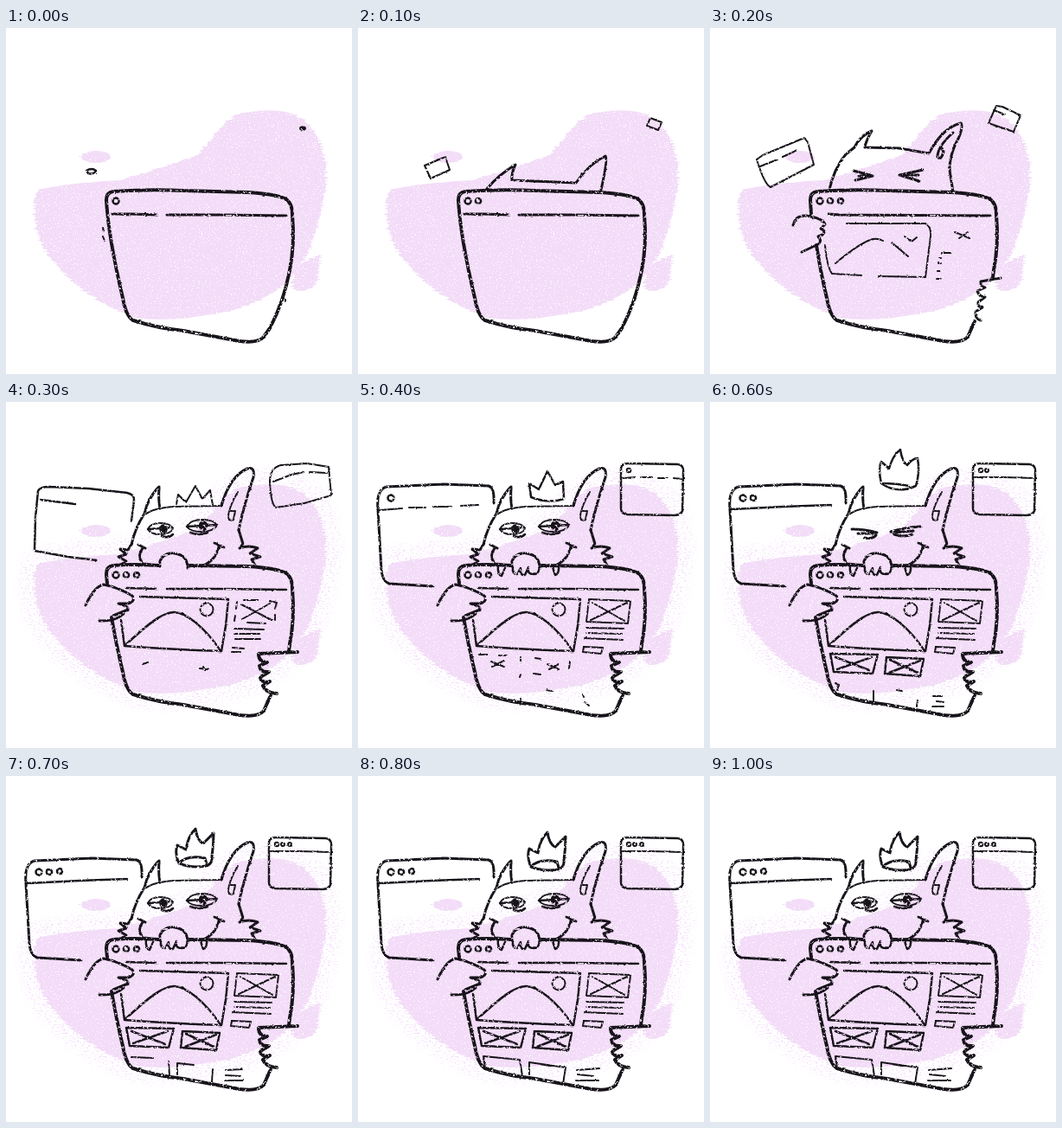
An HTML page for the animation above (1.1 s loop, 400 by 400 pixels).

```html
<!DOCTYPE html>
<html lang="en">
<head>
<meta charset="utf-8">
<title>Creature with browser window</title>
<style>
  html, body { margin: 0; width: 100%; height: 100%; overflow: hidden; background: #fff; }
  svg { display: block; width: 100vw; height: 100vh; }
  #ink { fill: none; stroke: #17131a; stroke-width: 2.5; stroke-linecap: round; stroke-linejoin: round; }
  #ink .bold { stroke-width: 4; }
  #ink .mid { stroke-width: 3; }
  #ink .thin { stroke-width: 2; }
  #ink .solid { fill: #17131a; }
</style>
</head>
<body>
<svg viewBox="0 0 400 400">
  <defs>
    <filter id="chalk" filterUnits="userSpaceOnUse" x="0" y="0" width="400" height="400" color-interpolation-filters="sRGB">
      <feTurbulence type="fractalNoise" baseFrequency=".025 .6" numOctaves="2" seed="4"/>
      <feColorMatrix values="1 0 0 0 0  0 0 0 0 .5  0 0 0 0 0  0 0 0 0 1" result="streaks"/>
      <feDisplacementMap in="SourceGraphic" in2="streaks" scale="12" xChannelSelector="R" yChannelSelector="G" result="edge"/>
      <feTurbulence type="fractalNoise" baseFrequency=".65" numOctaves="2" seed="9"/>
      <feColorMatrix values="0 0 0 0 0  0 0 0 0 0  0 0 0 0 0  7 0 0 0 -1.65" result="grain"/>
      <feComposite in="edge" in2="grain" operator="in"/>
    </filter>
    <filter id="spray" filterUnits="userSpaceOnUse" x="0" y="0" width="400" height="400" color-interpolation-filters="sRGB">
      <feTurbulence type="fractalNoise" baseFrequency=".4 .7" numOctaves="2" seed="5"/>
      <feColorMatrix values="0 0 0 0 0  0 0 0 0 0  0 0 0 0 0  7 0 0 0 -4" result="grain"/>
      <feGaussianBlur in="SourceGraphic" stdDeviation="5"/>
      <feComposite in2="grain" operator="in"/>
    </filter>
    <filter id="crayon" filterUnits="userSpaceOnUse" x="0" y="0" width="400" height="400" color-interpolation-filters="sRGB">
      <feTurbulence type="fractalNoise" baseFrequency=".3" numOctaves="2" seed="2"/>
      <feColorMatrix values="1 0 0 0 0  0 1 0 0 0  0 0 1 0 0  0 0 0 0 1" result="wobble"/>
      <feDisplacementMap in="SourceGraphic" in2="wobble" scale="2" xChannelSelector="R" yChannelSelector="G" result="rough"/>
      <feTurbulence type="fractalNoise" baseFrequency=".38" numOctaves="2" seed="7"/>
      <feColorMatrix values="0 0 0 0 0  0 0 0 0 0  0 0 0 0 0  8 0 0 0 -2.2" result="grain"/>
      <feComposite in="rough" in2="grain" operator="in"/>
    </filter>
  </defs>

  <g data-at="3-10" filter="url(#spray)">
    <use href="#blob" fill="none" stroke="#f3dbf8" stroke-width="36"/>
  </g>
  <g fill="#f3dcf8" filter="url(#chalk)">
    <path id="blob" d="M40 186Q85 178 130 176Q180 163 222 146C240 128 250 105 275 98Q305 92 332 99C352 107 367 130 370 160C371 205 355 255 335 283Q310 314 255 328Q195 341 148 335Q100 316 72 288Q32 255 33 208Q32 192 40 186Z"/>
    <ellipse cx="104" cy="149" rx="17" ry="7"/>
    <path d="M364 262Q337 269 334 288Q325 300 339 304Q359 305 361 284Z"/>
  </g>

  <g id="ink" filter="url(#crayon)">
    <!-- browser frame -->
    <g class="bold">
      <path data-at="0-2" d="M116 199Q116 190 124 189Q165 186 205 188L280 190Q311 192 322 197"/>
      <path data-at="3-10" d="M116 199Q116 190 124 189Q145 187 176 189M212 189L280 190Q311 192 322 197"/>
      <path data-at="0-1" d="M116 199C118 235 126 274 135 312Q139 334 147 338"/>
      <path data-at="2" d="M116 199L117 216M123 251Q128 283 135 312Q139 334 147 338"/>
      <path data-at="3-10" d="M116 199L117 210M122 249Q128 283 135 312Q139 334 147 338"/>
      <path d="M147 338Q175 347 205 350L270 362Q291 365 298 357"/>
      <path d="M322 197Q331 201 331 216Q334 250 328 280"/>
      <path data-at="0-1" d="M328 280Q321 317 305 347L298 357"/>
      <path data-at="2-10" d="M328 280L327 288M306 339L298 357"/>
    </g>
    <path class="mid" data-at="0-1" d="M123 215L145 215L174 216M186 216L250 216L324 217M131 215L141 216"/>
    <path class="mid" data-at="2" d="M137 215L150 216L324 217"/>
    <path data-at="3-10" d="M139 215L174 216M186 216L250 216L324 217"/>
    <circle cx="127" cy="200" r="3.5"/>
    <circle data-at="1-10" cx="139" cy="200" r="3.1"/>
    <circle data-at="2-10" cx="151" cy="200" r="3.1"/>
    <path class="thin" data-at="0" d="M112 231L113 235M112 241L114 246M323 314L323 316"/>

    <!-- page content -->
    <g data-at="2" class="thin">
      <path d="M158 226L249 226Q256 229 255 241L249 288L195 287M175 286L141 284Q135 275 133 251"/>
      <path d="M145 272Q170 251 185 245Q193 242 200 246M210 248L229 264"/>
      <path d="M225 241L233 247L239 242M283 236L300 243M298 236L288 243M268 260L279 260M265 266L267 266M264 272L267 272M263 281L266 281M262 290L267 290"/>
    </g>
    <g data-at="3-10">
      <path d="M155 225L257 228L254 259L249 288Q190 286 137 282L133 252"/>
      <path d="M139 280C162 259 180 243 194 243C208 243 230 261 247 286"/>
      <circle class="thin" cx="232" cy="240" r="7.5"/>
    </g>
    <path class="thin" data-at="3" d="M267 231L266 239M275 229L291 229M305 230L313 232L311 239M265 247L264 253M279 255L300 256M311 246L311 252M272 234L307 252M305 233L273 251M264 262L298 263M264 268L293 268M265 274L294 274M262 284L275 285M261 289L271 289M158 303L164 301M224 308L233 309M228 306L230 310"/>
    <g class="thin" data-at="4-10">
      <path d="M267 228L315 230L312 256L264 254ZM271 232L308 253M311 232L269 252"/>
      <path d="M264 261L307 262M264 267L305 268M262 273L306 275M261 283L283 284L281 291L260 289Z"/>
    </g>
    <path class="thin" data-at="4" d="M140 292L150 292M163 293L172 293M154 300L169 306M169 299L155 306M188 295L188 301M205 296L211 297M219 303L232 309M232 303L221 309M245 300L244 308M188 315L187 318M203 314L211 315M218 333L224 334M188 343L188 347M260 338L261 341M262 347L267 351"/>
    <g data-at="5-10">
      <path d="M139 291L194 292L188 314L143 312ZM145 295L184 310M187 295L147 309"/>
      <path d="M204 295L247 297L243 317L202 314ZM208 298L240 313M243 299L207 313"/>
    </g>
    <path class="thin" data-at="5" d="M147 326L150 327M188 341L189 346M218 333L223 334M262 340L267 340M264 349L268 350"/>
    <path class="thin" data-at="6" d="M145 325L149 327L147 333M189 334L189 347M216 333L222 334M240 345L239 352M258 340L268 340M262 346L270 347M257 352L270 352"/>
    <path class="thin" data-at="7" d="M145 325L170 326M188 330L189 347M198 346L198 332L217 334M239 339L238 354M254 340L273 339M254 346L271 347M253 352L274 352"/>
    <path class="thin" data-at="8-10" d="M147 338L145 324L187 328L190 347M198 347L198 331L240 337L237 356M210 333L222 335M253 340L279 338M254 345L272 347M252 352L278 352"/>

    <!-- rising head -->
    <g data-at="1" class="mid">
      <path d="M149 186Q162 170 182 158Q177 168 178 176L252 179Q267 157 286 148Q289 152 281 187"/>
    </g>
    <g data-at="2" class="mid">
      <path d="M138 187Q143 163 157 146L167 138Q174 124 187 119Q180 131 179 138L219 139L253 145C261 130 273 114 290 110Q293 112 288 126Q274 151 278 171L281 189"/>
      <path d="M281 121Q263 137 263 149Q267 154 270 143L268 139"/>
      <path d="M166 165L188 171L168 176M172 171L187 171M246 164L219 170L242 177M220 170L241 170"/>
    </g>

    <!-- full head -->
    <g data-at="3-10" class="mid">
      <path d="M145 165Q149 146 160 129L163 119Q170 104 177 98Q176 114 178 123"/>
      <path class="thin" d="M161 130Q169 123 194 121L250 120"/>
      <path d="M249 120C255 99 265 83 279 77Q288 74 286 87Q275 119 269 148"/>
      <path class="thin" d="M268 104Q259 119 257 131Q257 139 263 136L265 126L260 126"/>
      <path d="M269 148L274 164L270 169Q281 165 291 169L282 175L294 179L284 182L288 189"/>
      <path d="M144 166L141 171L132 170L139 176L130 179L139 184L133 188"/>
      <path d="M153 165L161 169M158 169Q150 181 160 187L172 189M241 163L252 168M246 167Q243 183 226 190"/>
      <path d="M178 190C176 179 186 174 195 175Q210 177 210 192"/>
    </g>
    <g data-at="4-10">
      <path d="M179 191Q178 199 184 199L188 192Q187 201 193 200L197 191Q195 199 203 199Q210 199 210 189"/>
      <path d="M162 189Q161 199 166 201L170 192M225 191L228 200Q233 199 232 188"/>
    </g>
    <g data-at="3-5 7-10">
      <path class="thin" d="M164 147Q167 140 178 140Q191 140 193 147Q189 153 178 153Q167 153 164 147ZM209 144Q213 136 227 136Q241 136 244 143Q239 150 226 150Q213 150 209 144Z"/>
      <path d="M164 147L193 145M209 144L244 142M180 155Q188 158 193 153M213 151Q224 155 233 151"/>
      <ellipse class="solid" cx="182" cy="147" rx="3.5" ry="4.5"/>
      <ellipse class="solid" cx="228" cy="143" rx="4" ry="5"/>
    </g>
    <path data-at="6" class="mid" d="M164 147Q179 147 193 151M171 152L190 152M179 157Q188 159 192 154M209 150Q225 145 243 144M211 151L235 149M213 153Q223 157 234 153"/>

    <!-- crown -->
    <path data-at="3" class="thin" d="M197 118L199 107L208 116L219 97L227 112L236 102L239 119"/>
    <path data-at="4" d="M200 110L198 94L209 101L219 80L228 96L237 92L238 112Q220 118 200 110"/>
    <path data-at="5" d="M199 100L196 82L208 89L219 66L228 83L239 78L239 103Q218 110 199 100M199 101Q213 102 232 104"/>
    <path data-at="6" d="M198 94Q194 77 198 69L207 77Q211 62 220 55Q222 69 228 73Q234 65 240 65Q243 81 238 97Q216 107 198 94M198 94Q215 94 230 97"/>
    <g data-at="7" class="mid" transform="translate(0 -4)"><use href="#crown"/></g>
    <g data-at="8-10" class="mid"><path id="crown" d="M199 103Q195 92 198 84L208 89Q210 74 219 65Q221 79 228 82L240 70Q240 84 238 97Q239 106 231 108Q215 111 200 105Q209 95 230 99L232 106"/></g>

    <!-- hands -->
    <g data-at="2" class="mid">
      <path d="M96 228Q99 216 111 217Q131 220 133 227L128 232Q135 235 130 239L125 241Q131 247 123 251L106 259"/>
      <path d="M336 289L313 293Q312 299 318 300L309 304Q311 311 318 311L310 317Q309 323 315 323L307 328Q306 336 313 338"/>
    </g>
    <g data-at="3-10" class="mid">
      <path d="M92 235Q102 213 113 211Q129 214 146 224Q150 230 142 233L130 233Q142 236 141 240L124 247M136 245Q126 254 108 253"/>
      <path class="bold" d="M337 289L314 290L292 291Q292 301 302 301L293 305Q294 313 304 312L294 318Q294 325 305 323L297 328Q300 336 313 337"/>
    </g>

    <!-- left window -->
    <path data-at="0" d="M93 165Q99 161 104 165Q102 170 95 168Z"/>
    <path data-at="1" class="thin" d="M77 159L101 149L106 164L84 174Z"/>
    <path data-at="2" class="thin" d="M54 152L61 147L109 127L113 132L120 158L70 184Q63 181 54 152M58 160L78 152M84 149L99 142"/>
    <path data-at="3" d="M105 183L72 179L33 172L34 134L37 103Q39 98 50 98L95 100L140 105Q149 107 148 114L145 137M40 113L56 115L80 118"/>
    <g data-at="4-10">
      <path class="mid" d="M87 213L36 210Q28 207 27 194L23 124Q21 101 33 98L99 95L151 97Q158 99 157 117"/>
      <circle cx="38" cy="111" r="3.5"/>
    </g>
    <path data-at="4" class="thin" d="M25 125L51 123M59 122L78 122M87 121L108 121M119 120L139 119"/>
    <path data-at="5-10" d="M25 124L85 121L140 119"/>
    <circle data-at="6-10" cx="50" cy="111" r="3.1"/>
    <circle data-at="7-10" cx="62" cy="110" r="3"/>

    <!-- right window -->
    <ellipse data-at="0" class="solid" cx="343" cy="116" rx="2.7" ry="1.5"/>
    <path data-at="1" class="thin" d="M338 104L351 109L347 118L334 113Z"/>
    <path data-at="2" class="thin" d="M331 90L338 91L359 101L351 120L322 110ZM328 95L341 100"/>
    <path data-at="3" class="thin" d="M305 92Q305 76 318 73L348 71L373 75L376 108L345 117L312 122Q306 118 305 92M309 92L330 84L344 81M351 81L371 82"/>
    <g data-at="4-10">
      <path d="M304 77Q304 71 313 71L370 72Q377 73 376 82L375 126Q373 131 364 131L311 130Q304 129 304 123Z"/>
      <circle class="thin" cx="313" cy="79" r="2.3"/>
    </g>
    <path data-at="4" class="thin" d="M306 88L321 87M327 87L340 87M347 88L358 88M365 88L375 89"/>
    <path data-at="5-10" class="thin" d="M306 87L340 87L375 88"/>
    <circle data-at="6-10" class="thin" cx="320" cy="79" r="2"/>
    <circle data-at="7-10" class="thin" cx="328" cy="79" r="1.9"/>
  </g>
</svg>
<script>
  const STEP = 100, LOOP = 1100;

  // data-at lists the steps of the loop in which a part is visible.
  const parts = [...document.querySelectorAll('[data-at]')].map(node => ({
    node,
    ranges: node.dataset.at.split(' ').map(range => {
      const [from, to = from] = range.split('-').map(Number);
      return { from, to };
    })
  }));

  let shown = -1;

  function draw(time) {
    const pose = Math.floor((time % LOOP) / STEP);
    if (pose === shown) return;
    shown = pose;
    for (const { node, ranges } of parts) {
      const visible = ranges.some(r => pose >= r.from && pose <= r.to);
      node.style.display = visible ? '' : 'none';
    }
  }

  const start = performance.now();
  function tick() {
    draw(performance.now() - start);
    requestAnimationFrame(tick);
  }
  tick();
</script>
</body>
</html>
```
